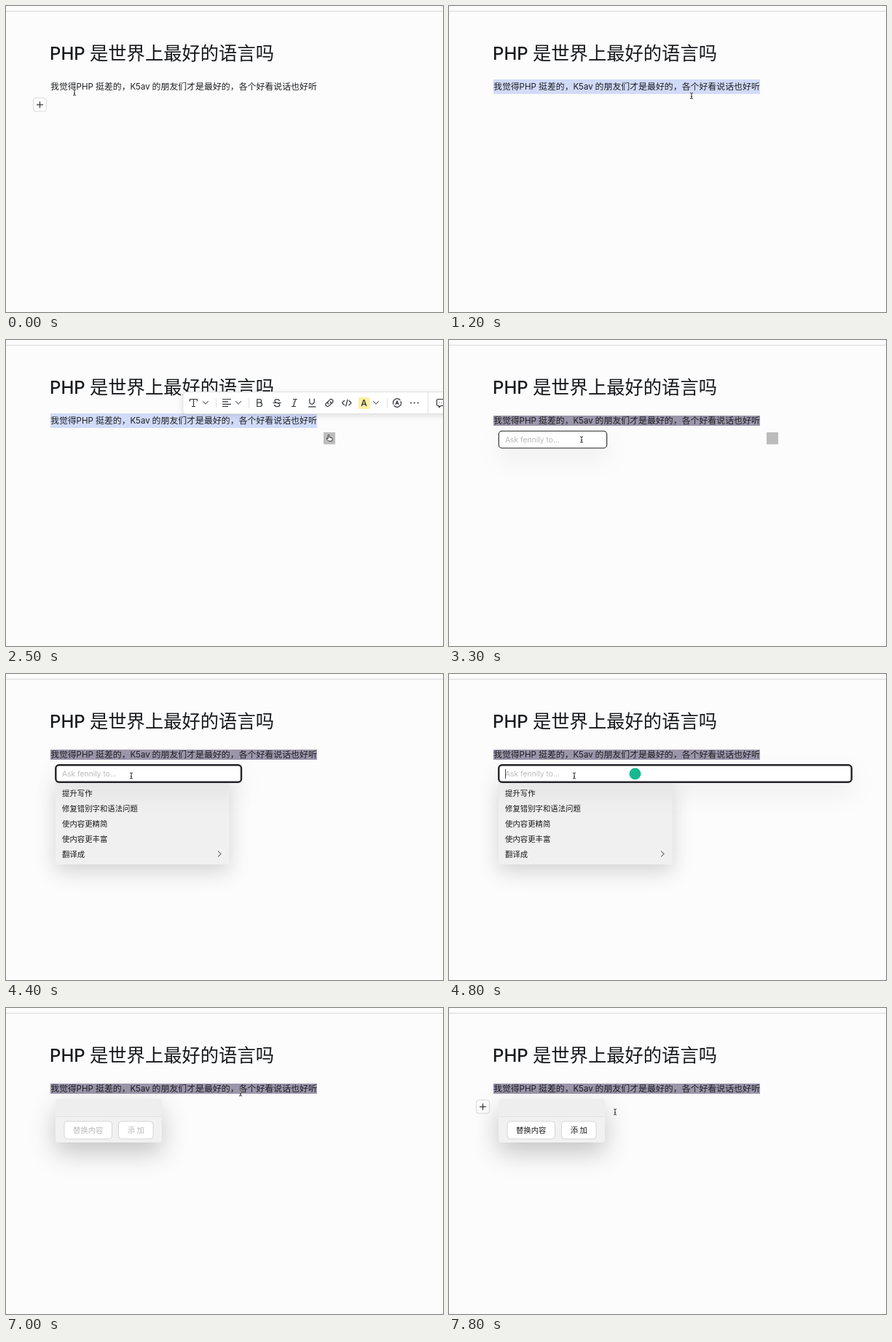
An HTML page that plays this animation: 600x421 px, repeating every 8000 ms.

```html
<!DOCTYPE html>
<html lang="zh-CN">
<head>
<meta charset="utf-8">
<title>Editor demo</title>
<style>
  html, body { margin: 0; width: 100%; height: 100%; overflow: hidden; background: #fcfcfc; }
  svg { display: block; width: 600px; height: 421px; }
  text { font-family: "Noto Sans CJK SC", "Noto Sans CJK", sans-serif; fill: #1f2124; white-space: pre; }
  .latin { font-family: Inter, "Noto Sans CJK SC", sans-serif; }
  .title { font-size: 25.3px; font-weight: 500; fill: #17191c; }
  .title.latin { font-size: 24px; }
  .body { font-size: 11.92px; }
  .body.latin { font-size: 11.5px; }
  .small { font-size: 10.4px; fill: #1c1c1c; }
  .hint { font-size: 10.3px; fill: #b9b9bb; }
  .line { fill: none; stroke: #33363b; stroke-width: 1.2; stroke-linecap: round; stroke-linejoin: round; }
  .soft { stroke: #77797d; }
  .sep { stroke: #dfdfe1; stroke-width: 1; }
  .glyph { font: 600 13px Inter, sans-serif; fill: #2b2e33; text-anchor: middle; }
  #toolbar { filter: drop-shadow(0 2px 4px rgba(0,0,0,.12)); }
  #input { filter: drop-shadow(0 14px 16px rgba(0,0,0,.06)); }
  #menu { filter: drop-shadow(0 10px 14px rgba(0,0,0,.16)); }
  #panel { filter: drop-shadow(0 14px 17px rgba(0,0,0,.22)); }
</style>
</head>
<body>
<svg viewBox="0 0 600 421">
  <rect width="600" height="421" fill="#fcfcfc"/>
  <rect y="6.6" width="600" height="1.2" fill="#dcdcde"/>

  <rect id="blue" x="61" y="101" width="366" height="20" fill="#d1dbf9"/>
  <rect id="grey" x="61" y="104" width="366" height="14" fill="#9c96ab"/>

  <text class="title latin" x="60" y="73.5">PHP</text>
  <text class="title" x="115" y="74">是世界上最好的语言吗</text>
  <text class="body" x="61" y="115.4">我觉得</text>
  <text class="body latin" x="96.6" y="115.2">PHP</text>
  <text class="body" x="123" y="115.4">挺差的，</text>
  <text class="body latin" x="170.4" y="115.2">K5av</text>
  <text class="body" x="200.6" y="115.4">的朋友们才是最好的，各个好看说话也好听</text>

  <g id="plus">
    <rect x="37.5" y="126.5" width="18" height="18.5" rx="3.5" fill="#fdfdfd" stroke="#dadadc"/>
    <path class="line" d="M42.5 135.8h8M46.5 131.8v8"/>
  </g>

  <g id="toolbar">
    <rect x="243" y="71.5" width="380" height="30" rx="4" fill="#fff" stroke="#e2e2e4"/>
    <path class="sep" d="M288.5 80v13M333.5 80v13M523.5 80v13M579.5 72v29"/>
    <path class="line" d="M252.5 84v-2.5h10V84M257.5 81.500v10M255.500 91.500h4"/>
    <path class="line" d="M297.500 81.500h11M297.500 84.900h7M297.500 88.300h11M297.500 91.500h7"/>
    <path class="line soft" d="M270.500 84.500l3.500 3.500 3.500-3.500M315.500 84.500l3.500 3.500 3.500-3.500M504.500 84.500l3.500 3.500 3.500-3.500"/>
    <path class="line" stroke-width="1.6" d="M344.800 81.500v10h4a2.700 2.700 0 0 0 0-5.400h-4h3.600a2.300 2.300 0 0 0 0-4.600z"/>
    <path class="line" d="M375.500 83.500c-.8-2.700-6.600-2.600-6.600.3 0 1.500 1.600 2.200 3.200 2.700 1.900.5 3.700 1 3.700 2.800 0 3-6.500 3-7.300 0M366.800 86.500h10.500"/>
    <path class="line" d="M394.500 81.500h5M392.500 91.500h5M397.500 81.500l-3 10"/>
    <path class="line" d="M416.800 81v4a3.200 3.200 0 0 0 6.400 0v-4M415.500 91.800h9.500"/>
    <path class="line" d="M442.500 88a2.600 2.600 0 0 1 0-3.600l2-2a2.600 2.600 0 0 1 3.700 3.700l-1.200 1.200M445.500 85a2.600 2.600 0 0 1 0 3.600l-2 2a2.600 2.600 0 0 1-3.700-3.700l1.200-1.200"/>
    <path class="line" d="M464.500 83.500l-3 3 3 3M471 83.500l3 3-3 3M469 82l-2.400 9"/>
    <rect x="484" y="79" width="15.500" height="16" rx="2" fill="#fff0a0"/>
    <text class="glyph" x="491.600" y="91" style="font-weight:500;font-size:12px">A</text>
    <path class="line" d="M532 88.500a5.500 5.500 0 0 1 9-6M542 84.500a5.500 5.500 0 0 1-9 6M535 88.800l2-5 2 5M535.700 87.300h2.600"/>
    <path class="line" stroke-width="2" d="M556 86.500h.1M560.700 86.500h.1M565.500 86.500h.1" style="stroke-width:1.900"/>
    <path class="line" d="M602 81.500h-9a1.500 1.500 0 0 0-1.500 1.500v6a1.500 1.500 0 0 0 1.500 1.500h1.500v2.200l2.600-2.200h5M595 86h.1M598 86h.1"/>
  </g>
  <rect id="badge" x="436" y="127" width="16" height="16.500" fill="#bcbcbc"/>

  <g id="menu">
    <path d="M68 146H306.500V258a4 4 0 0 1-4 4H72a4 4 0 0 1-4-4z" fill="#f0f0f1"/>
    <rect id="hover" x="72" y="153.500" width="230" height="20.500" rx="4" fill="#dcdcde"/>
    <g id="items"></g>
    <path class="line soft" d="M291.500 243.800l3.600 3.700-3.600 3.700"/>
  </g>

  <g id="input">
    <rect id="field" x="68.300" y="125.200" height="23.600" rx="4.500" fill="#fff"/>
    <text class="hint latin" x="77" y="141">Ask fennily to...</text>
    <path id="caret" d="M77.500 131v13" stroke="#444" fill="none"/>
    <circle id="dot" cx="255.500" cy="137.300" r="8" fill="#17b890"/>
  </g>

  <g id="panel">
    <rect x="68" y="125" width="146" height="60" rx="4" fill="#f1f1f2"/>
    <rect x="68" y="125" width="146" height="24.500" rx="4" fill="#eeeeef"/>
    <path d="M68 149.500h146" stroke="#e4e4e5"/>
    <g fill="#fff" stroke="#d6d6d8">
      <rect x="80" y="156" width="65.500" height="24" rx="4"/>
      <rect x="154.500" y="156" width="47.500" height="24" rx="4"/>
    </g>
    <g id="labels" text-anchor="middle">
      <text class="small" x="112.700" y="171.900">替换内容</text>
      <text class="small" x="178.300" y="171.900">添 加</text>
    </g>
  </g>

  <path id="beam" fill="none" stroke="#fff" stroke-width="2" d=""/>
  <path id="beamInk" fill="none" stroke="#222" stroke-width=".95" d="M-2-4Q0-4 0-3Q0-4 2-4M0-3.500V3.500M-2 4Q0 4 0 3Q0 4 2 4M-1 1h2"/>
  <path id="hand" fill="#fff" stroke="#222" stroke-width=".9" stroke-linejoin="round"
    d="M-1.800 1V-3.600a.9.900 0 0 1 1.800 0V-1l3 .5q1.300.3 1.100 1.600l-.6 3H-.8L-3.800 1.200q-.5-1.300.7-1.200z"/>
</svg>
<script>
const LOOP = 8000, STEP = 100;
const el = id => document.getElementById(id);

// Visible spans per part, in ms
const spans = {
  plus: [[0, 600], [7500, LOOP]],
  blue: [[700, 2700]],
  grey: [[2700, LOOP]],
  toolbar: [[2000, 2700]],
  badge: [[1900, 4000]],
  input: [[2700, 6200]],
  caret: [[4000, 4400], [4600, 5300]],
  dot: [[4600, 5100]],
  menu: [[4400, 6200]],
  panel: [[6200, LOOP]]
};

// Pointer path: time, x, y
const path = [
  [0, 94, 119], [600, 29, 105], [900, 29, 105], [1000, 125, 115], [1100, 238, 121],
  [1200, 333, 123.5], [1500, 402, 122], [1800, 428, 119], [2200, 428, 119],
  [2500, 444, 135], [2600, 444, 135], [2700, 375, 138], [3000, 235, 139],
  [3300, 182, 137], [3500, 180, 137], [3800, 180, 137], [4100, 172, 140],
  [4800, 172, 140], [5200, 136, 168], [5500, 134, 172], [5600, 134, 172],
  [5700, 133, 172], [6100, 133, 172], [6200, 215, 148], [6400, 322, 117],
  [7100, 322, 117], [7500, 250, 137], [7800, 228, 143], [LOOP, 228, 143]
];

const items = ['提升写作', '修复错别字和语法问题', '使内容更精简', '使内容更丰富', '翻译成'];
el('items').innerHTML = items.map((s, i) =>
  `<text class="small" x="77" y="${167.9 + i * 20.9}">${s}</text>`).join('');
el('beam').setAttribute('d', el('beamInk').getAttribute('d'));

const show = (id, on) => { el(id).style.display = on ? '' : 'none'; };
const within = (t, a, b) => t >= a && t < b;
const clamp = u => Math.max(0, Math.min(1, u));

function pointerAt(t) {
  const i = Math.max(1, path.findIndex(p => p[0] >= t));
  const [t0, x0, y0] = path[i - 1], [t1, x1, y1] = path[i];
  const u = (t - t0) / (t1 - t0);
  return [x0 + (x1 - x0) * u, y0 + (y1 - y0) * u];
}

function drawField(t) {
  const open = t >= 4400, blurred = t >= 6000;
  const grow = 1 - Math.pow(1 - clamp((t - 4300) / 900), 2.85);
  const field = el('field');
  field.setAttribute('width', 148.4 + 373 * grow);
  field.setAttribute('stroke', blurred ? '#58585b' : '#242428');
  field.setAttribute('stroke-width', blurred ? 1.9 : open ? 2.4 : 1.1);
}

function draw(t) {
  for (const id in spans) show(id, spans[id].some(([a, b]) => within(t, a, b)));
  el('toolbar').style.opacity = clamp((t - 1900) / 200);
  el('labels').style.opacity = t < 7300 ? 0.3 : 1;
  drawField(t);

  const [x, y] = pointerAt(t);
  const inMenu = within(t, 4400, 6200) && y > 153;
  const hand = inMenu || within(t, 2500, 2700);
  show('hover', inMenu);
  show('hand', hand);
  show('beam', !hand);
  show('beamInk', !hand);
  for (const id of ['hand', 'beam', 'beamInk'])
    el(id).setAttribute('transform', `translate(${x} ${y})`);
}

function tick() {
  const t = performance.now() % LOOP;
  draw(Math.min(Math.floor(t / STEP) * STEP, 7800));
  requestAnimationFrame(tick);
}
tick();
</script>
</body>
</html>
```
